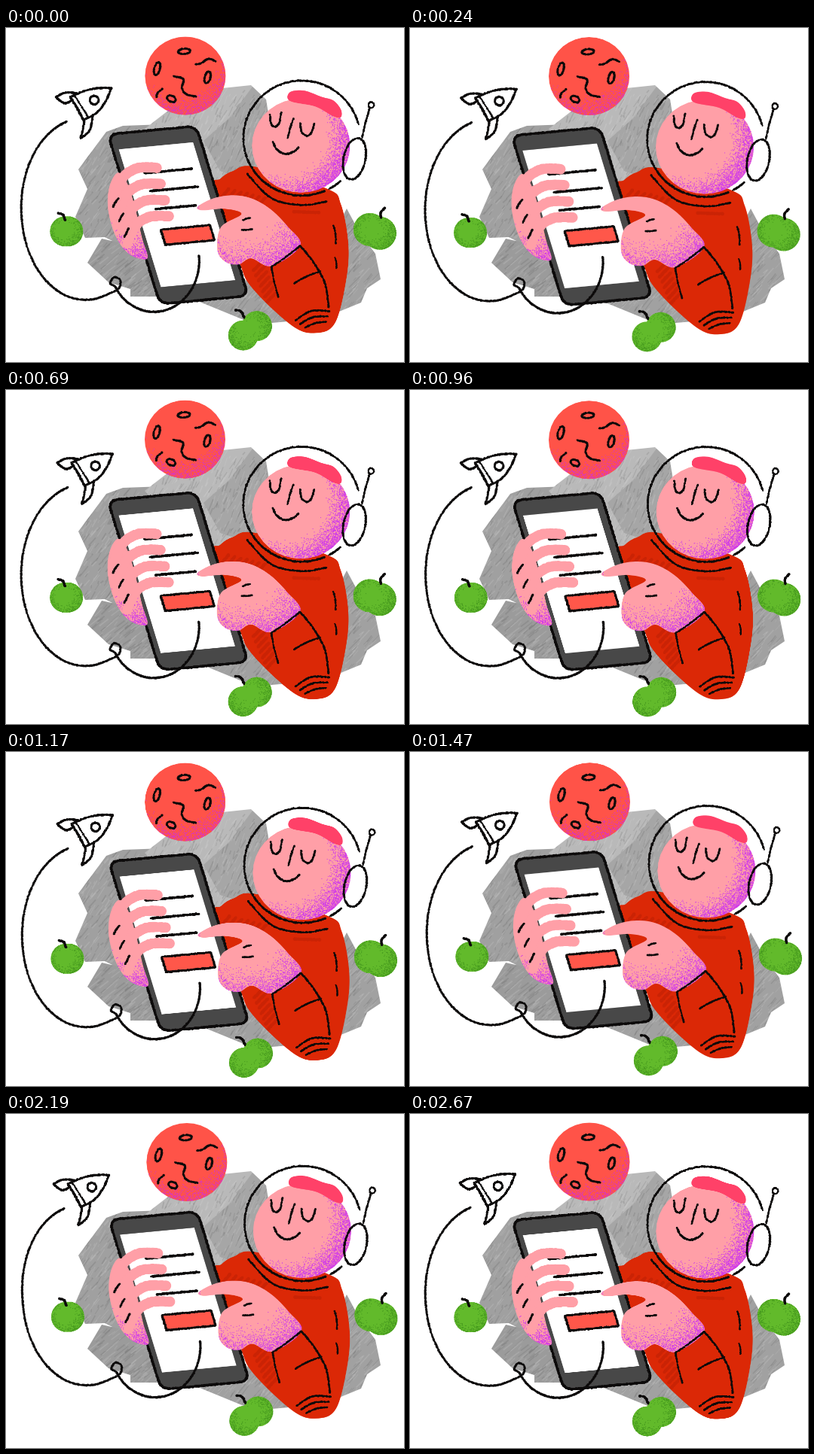
Animation, 528 px wide and 444 px high, one loop 2700 ms. Source, as an HTML page with a canvas:

```html
<!DOCTYPE html>
<html lang="en">
<head>
<meta charset="utf-8">
<title>Astronaut with phone</title>
<style>
html, body { margin: 0; width: 100%; height: 100%; overflow: hidden; background: #fff; }
canvas { display: block; width: 528px; height: 444px; }
</style>
</head>
<body>
<canvas id="stage" width="528" height="444"></canvas>
<script>
const W = 528, H = 444, LOOP = 2700, SCALE = 2;
const BLACK = '#0c0a0a', PINK = '#ff9fa7', PURPLE = '#d03cea', RED = '#db2806';
const stage = document.getElementById('stage').getContext('2d');
let ctx = stage, seed = 7;

function random() {
  seed = (Math.imul(seed, 1664525) + 1013904223) >>> 0;
  return seed / 4294967296;
}
const clamp = v => Math.max(0, Math.min(1, v));
const spread = n => (random() - 0.5) * n;
const mix = (a, b, t) => a + (b - a) * t;

// ---- Geometry: flat coordinates in, lists of points out ----

function pairs(flat) {
  const out = [];
  for (let i = 0; i < flat.length; i += 2) out.push([flat[i], flat[i + 1]]);
  return out;
}

// Catmull-Rom curve through the given points.
function spline(flat, closed = false) {
  const p = pairs(flat), n = p.length, out = [], STEPS = 14;
  const at = i => closed ? p[(i + n) % n] : p[Math.max(0, Math.min(n - 1, i))];
  for (let i = 0; i < (closed ? n : n - 1); i++) {
    const [a, b, c, d] = [at(i - 1), at(i), at(i + 1), at(i + 2)];
    for (let s = 0; s <= STEPS; s++) {
      const t = s / STEPS;
      out.push([0, 1].map(k => b[k] + 0.5 * t * (c[k] - a[k]
        + t * (2 * a[k] - 5 * b[k] + 4 * c[k] - d[k]
        + t * (3 * (b[k] - c[k]) + d[k] - a[k])))));
    }
  }
  return out;
}

function arc(cx, cy, rx, ry, from = 0, to = 360, tilt = 0) {
  const rad = Math.PI / 180, c = Math.cos(tilt * rad), s = Math.sin(tilt * rad);
  return Array.from({ length: 37 }, (_, i) => {
    const a = mix(from, to, i / 36) * rad, x = rx * Math.cos(a), y = ry * Math.sin(a);
    return [cx + x * c - y * s, cy + x * s + y * c];
  });
}

// Rounded box in the phone's own slanted coordinates.
const onPhone = ([x, y]) => [135 + 0.996 * x + 0.292 * y, 141 - 0.0936 * x + 0.9564 * y];
function slab(left, top, right, bottom, r) {
  const out = [
    ...arc(right - r, bottom - r, r, r, 0, 90), ...arc(left + r, bottom - r, r, r, 90, 180),
    ...arc(left + r, top + r, r, r, 180, 270), ...arc(right - r, top + r, r, r, 270, 360)
  ].map(onPhone);
  return [...out, out[0]];
}

function toPath(...shapes) {
  const path = new Path2D();
  for (const points of shapes) {
    points.forEach(([x, y], i) => i ? path.lineTo(x, y) : path.moveTo(x, y));
    path.closePath();
  }
  return path;
}
const blob = (...flat) => toPath(spline(flat, true));

// ---- Drawing ----

function fill(path, color) {
  ctx.fillStyle = color;
  ctx.fill(path);
}

// A chalky line: overlapping dots of uneven size.
function ink(points, width = 2.6, color = BLACK) {
  ctx.fillStyle = color;
  ctx.beginPath();
  points.slice(1).forEach(([bx, by], i) => {
    const [ax, ay] = points[i];
    const steps = Math.ceil(Math.hypot(bx - ax, by - ay) / 0.8);
    for (let s = 0; s < steps; s++) {
      const x = mix(ax, bx, s / steps) + spread(0.7), y = mix(ay, by, s / steps) + spread(0.7);
      const r = width / 2 + spread(0.8);
      ctx.moveTo(x + r, y);
      ctx.arc(x, y, r, 0, 7);
    }
  });
  ctx.fill();
}
const line = (width, ...flat) => ink(spline(flat), width);

// Stipple that thickens with the distance from a light point.
function shade(path, color, [x, y, w, h], lx, ly, near, far, peak = 0.85) {
  ctx.save();
  ctx.clip(path);
  ctx.fillStyle = color;
  for (let i = 0; i < w * h * 1.8; i++) {
    const px = x + random() * w, py = y + random() * h;
    const k = clamp((Math.hypot(px - lx, py - ly) - near) / (far - near));
    if (random() < k * k * peak) ctx.fillRect(px, py, 1, 1);
  }
  ctx.restore();
}

function layer(draw) {
  const canvas = document.createElement('canvas');
  canvas.width = W * SCALE;
  canvas.height = H * SCALE;
  ctx = canvas.getContext('2d');
  ctx.scale(SCALE, SCALE);
  draw();
  ctx = stage;
  return canvas;
}

function rock(base, lean, ...outline) {
  const points = pairs(outline), path = toPath(points);
  const [x0, x1, y0, y1] = [0, 0, 1, 1].map((axis, i) =>
    Math[i % 2 ? 'max' : 'min'](...points.map(p => p[axis])));
  fill(path, base);
  ctx.save();
  ctx.clip(path);
  for (let i = (x1 - x0) * (y1 - y0) / 45; i > 0; i--) {
    const x = mix(x0, x1, random()), y = mix(y0, y1, random()), length = 3 + random() * 12;
    ctx.strokeStyle = random() < 0.5 ? 'rgba(80,80,80,.17)' : 'rgba(225,225,225,.17)';
    ctx.lineWidth = 0.6 + random() * 1.3;
    ctx.beginPath();
    ctx.moveTo(x, y);
    ctx.lineTo(x + length * lean + spread(5), y + length);
    ctx.stroke();
  }
  ctx.restore();
}

function drawRocks() {
  rock('#a0a0a0', -0.7, 133,138, 155,130, 210,128, 250,190, 240,300, 165,295, 131,278,
    105,279, 92,251, 108,214, 96,188);
  rock('#9b9b9b', -1.2, 127,280, 215,300, 220,357, 165,357, 165,347, 136,338, 108,312);
  rock('#b9b9b9', -0.5, 184,134, 238,92, 287,80, 325,76, 345,95, 356,160, 330,210, 260,220);
  rock('#a6a6a6', -0.45, 284,190, 262,150, 296,120, 327,78, 345,95, 356,170, 330,205);
  rock('#a1a1a1', -0.9, 252,362, 310,335, 400,340, 452,240, 468,270, 490,300, 497,334,
    479,346, 471,365, 420,386, 330,394);
}

function drawPlanet() {
  const body = toPath(arc(237.5, 63.5, 53.5, 52));
  fill(body, '#ff5348');
  shade(body, '#d836c4', [184, 11, 108, 105], 229, 38, 46, 92);
  ink(arc(200, 54, 3.8, 8.5, 0, 360, 15));
  ink(arc(267, 65.5, 3.8, 8, 0, 360, 15));
  ink(arc(236, 31, 8, 3.5, 0, 360, -5));
  ink(arc(219, 94, 6, 4, 0, 360, 25));
  line(2.6, 199,92, 201,86, 207,81);
  line(2.6, 251,48, 258,47, 268,41, 278,44);
  line(2.6, 222,64, 235,68, 233,80, 239,88, 252,91);
}

function drawBody() {
  const body = blob(274,214, 284,200, 300,190, 330,184, 425,213, 444,234, 454,290, 450,340,
    436,392, 412,405, 380,396, 326,345, 308,308);
  fill(body, RED);
  ctx.save();
  ctx.clip(body);
  ctx.globalAlpha = 0.35;
  for (let i = 0; i < 7; i++) {
    const hatch = (x, y) => ink([[x, y], [x + 12, y - 13]], 4, '#a81a04');
    hatch(284 + i * 8, 226 + i * 2);
    hatch(328 + i * 3, 322 + i * 7);
  }
  ink([[382, 244], [415, 245]], 4, '#a81a04');
  ctx.restore();
  line(2.4, 320,194, 352,226, 392,235, 426,230);
  line(2, 434,262, 437,274, 437,286);
  line(2, 436,305, 438,312, 438,319);
  for (let k = 0; k < 3; k++)
    line(2.3, 384 + 6 * k, 388 + 5 * k, 404 + 3 * k, 376 + 8 * k, 429 - 2 * k, 376 + 7 * k);
}

function drawHead() {
  const head = toPath(arc(391, 156, 65, 62.5));
  fill(head, PINK);
  shade(head, PURPLE, [325, 92, 132, 128], 367, 139, 52, 92);
  fill(blob(373,92, 378,84, 396,83, 418,91, 434,96, 444,108, 444,118, 434,117, 410,104, 380,98),
    '#ff4168');
  line(2.4, 350,115, 351,126, 356,131, 362,126, 365,111);
  line(2.4, 390,126, 392,138, 399,143, 405,138, 409,126);
  line(2.4, 381,120, 377,131, 373,147);
  line(2.5, 354,151, 359,161, 370,167, 381,164, 388,158);
  ink(arc(392, 146, 77.5, 76.5, -14, -293));
  ink(arc(392, 146, 77.5, 76.5, 62, 48));
  ink(arc(462, 173.5, 14.5, 28, 0, 360, 12));
  line(2.4, 472,145, 476,128, 482,107);
  ink(arc(484, 102, 3.7, 3.7), 2.2);
}

function drawPhone() {
  const shell = slab(0, 0, 117.5, 236, 12);
  fill(toPath(shell), '#484848');
  ink(shell, 3.2);
  fill(toPath(slab(8, 21.5, 107, 213, 0)), '#fff');
  [95, 97, 86].forEach((end, i) =>
    ink([[32, 57 + 25 * i], [end, 57 + 25 * i]].map(onPhone), 3.2));
  const button = slab(30.5, 135.5, 96, 156.5, 0);
  fill(toPath(button), '#ff574a');
  ink(button, 2.8);
}

function drawLeftHand() {
  const palm = blob(148,192, 137,210, 135,240, 145,276, 163,300, 187,306, 180,278, 170,235, 160,205);
  fill(palm, PINK);
  shade(palm, PURPLE, [132, 180, 58, 128], 166, 190, 70, 126);
  for (let i = 0; i < 4; i++) {
    const x = 5.5 * i, y = 21.5 * i;
    ink(spline([144 + x, 222 + y, 154 + x, 199 + y, 174 + x, 186 + y, 200 + x, 185.5 + y]), 13, PINK);
  }
  for (let i = 0; i < 3; i++)
    line(2.4, 142 + 7.5 * i, 237 + 20 * i, 145 + 7.5 * i, 231 + 20 * i, 149 + 6.5 * i, 226 + 20 * i);
}

function drawRightHand() {
  const hand = blob(254,237, 275,226, 300,222, 325,226, 350,240, 373,263, 390,289, 352,316,
    325,306, 308,314, 290,310, 280,294, 285,264, 312,247, 290,240, 260,242);
  fill(hand, PINK);
  shade(hand, PURPLE, [252, 222, 142, 96], 312, 230, 44, 112);
  line(2.2, 314,255, 319,253, 324,252);
  line(2.2, 313,268, 319,268, 326,267);
  line(2.2, 352,317, 371,304, 390,289);
  line(2.2, 352,317, 355,335, 361,357);
  line(2.4, 390,289, 409,313, 423,340, 428,372);
  line(2.4, 382,339, 398,330, 417,323);
}

// Two round lobes set apart along an angle, with a bent stem.
function drawApple(x, y, r, gap, angle, ...stem) {
  const dx = gap * Math.cos(angle), dy = gap * Math.sin(angle), size = r + gap;
  const path = toPath(arc(x - dx, y - dy, r, r), arc(x + dx, y + dy, r, r));
  fill(path, '#62ba2b');
  shade(path, '#46991f', [x - size, y - size, 2 * size, 2 * size], x - 3, y - 4, 8, size + 6, 0.7);
  line(3, ...stem);
}

function drawRocket() {
  line(2.8, 88,90, 108,82, 125,79, 141,79);
  line(2.8, 105,121, 121,112, 133,97, 141,79);
  line(3, 86,91, 95,105, 104,122);
  line(2.2, 92,89, 101,103, 110,118);
  line(2.8, 95,86, 80,85, 67,91);
  line(2.8, 67,91, 78,99, 88,96);
  line(2.8, 105,122, 103,134, 100,146);
  line(2.8, 100,146, 112,135, 116,116);
  ink(arc(118, 95, 5.8, 5.8));
}

const rocks = layer(drawRocks);
const planet = layer(drawPlanet);
const rocket = layer(drawRocket);
const crew = layer(() => {
  drawBody();
  drawHead();
  drawPhone();
  drawLeftHand();
  drawRightHand();
  drawApple(80, 270, 20, 2, 0, 69,246, 75,248, 78,255);
  drawApple(489, 270, 22, 7, 0.35, 497,252, 497,245, 502,239);
  drawApple(323.5, 402, 20, 11, -0.6, 304,375, 311,376, 316,385);
});

// The trail: a wide arc, a small loop, then a sweep up onto the phone.
const TRAIL = spline([
  ...arc(105, 240, 85, 121, 254, 72),
  [149, 346], [151, 335], [143, 331], [138, 339],
  ...arc(196, 309, 60, 68, 150, -6)
].flat());

// ---- Motion ----

// Rises to `size` at the time `peak` and sinks back once per period.
function swing(t, peak, size, sharp = 1, period = LOOP) {
  return size * (0.5 + 0.5 * Math.cos(2 * Math.PI * (t - peak) / period)) ** sharp;
}
const crewDrift = t => [swing(t, 1750, 2.7, 1.3), swing(t, 850, 6.6, 1.8) - 0.4];
const planetDrift = t => [swing(t, 2000, 2.7, 2.5), swing(t, 1200, 3.1)];
const rocketDrift = t => [
  swing(t, 470, 2, 2, LOOP / 3) - swing(t, 2150, 6, 4),
  crewDrift(t)[1] + swing(t, 2150, 2.5, 4)
];

// The trail's start follows the rocket, the rest follows the phone.
function drawTrail(head, tail) {
  seed = 99;
  ink(TRAIL.map(([x, y], i) => {
    const k = clamp(5 * i / TRAIL.length);
    return [x + mix(head[0], tail[0], k), y + mix(head[1], tail[1], k)];
  }), 2.7);
}

function frame(now) {
  const t = Math.floor(now % LOOP / 30) * 30;
  const main = crewDrift(t), ship = rocketDrift(t);
  const put = (image, [x, y]) => stage.drawImage(image, x, y, W, H);
  stage.fillStyle = '#fff';
  stage.fillRect(0, 0, W, H);
  put(rocks, [0, 0]);
  put(planet, planetDrift(t));
  put(crew, main);
  drawTrail(ship, main);
  put(rocket, ship);
}

const start = performance.now();
function tick() {
  frame(performance.now() - start);
  requestAnimationFrame(tick);
}
tick();
</script>
</body>
</html>
```
